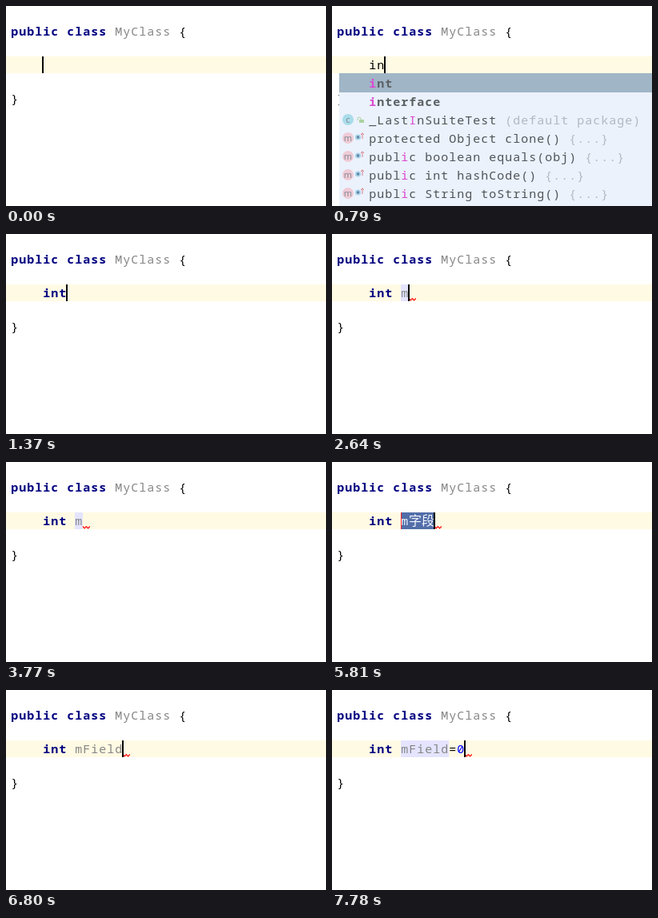
Write an HTML page that moves like this. It is 400x250 px and loops after 8000 ms.

```html
<!DOCTYPE html>
<html lang="en">
<head>
<meta charset="utf-8">
<title>Field naming in an editor</title>
<style>
  html, body { margin: 0; width: 100%; height: 100%; overflow: hidden; background: #fff; }
  svg { display: block; width: 400px; height: 250px; }
  text {
    font: 300 15px "Noto Sans Mono", "DejaVu Sans Mono", monospace;
    letter-spacing: 1px;
    white-space: pre;
  }
  .kw { font-weight: 700; fill: #000080; }
  .dim { fill: #868686; }
  .num { fill: #0000ff; }
  .sel { fill: #f4f7ff; }
  .cjk { font: 16px "Noto Sans CJK SC", "Noto Sans CJK", sans-serif; letter-spacing: 0; }
  .item { fill: #505459; }
  .bold { font-weight: 700; fill: #5c6064; }
  .hit { fill: #dc4ad0; }
  .tail { fill: #b2b8c0; }
  .badge { font: 11px "Noto Sans", sans-serif; letter-spacing: 0; text-anchor: middle; fill: #858b94; }
</style>
</head>
<body>
<svg id="stage" viewBox="0 0 400 250"></svg>
<script>
const LOOP = 8000;
const LEFT = 6.3, CELL = 10, ROW = 23;
const stage = document.getElementById("stage");

const colX = col => LEFT + col * CELL;
const span = (cls, s) => `<tspan class="${cls}">${s}</tspan>`;
const text = (x, y, s, cls = "") => `<text x="${x}" y="${y}" class="${cls}">${s}</text>`;
const rect = (x, y, w, h, fill) =>
  `<rect x="${x}" y="${y}" width="${w}" height="${h}" fill="${fill}"/>`;

// Each step changes only the listed parts of the editor state.
const steps = [
  [0, { word: "", name: "", cls: "", tail: "", caret: 45, wave: 0, mark: 0, bulb: 0, box: 0, list: 0, names: 0 }],
  [550, { word: "i", caret: 55 }],
  [670, { list: 1 }],
  [790, { word: "in", caret: 65 }],
  [910, { word: "int", caret: 75 }],
  [1370, { list: 0 }],
  [1650, { caret: 85 }],
  [1770, { wave: 86 }],
  [2040, { wave: 76 }],
  [2340, { name: "m", caret: 95 }],
  [2640, { cls: "dim", wave: 96, mark: 10 }],
  [3240, { bulb: 1 }],
  [3490, { caret: 0 }],
  [3770, { bulb: 0 }],
  [4360, { name: "m字段", caret: 127, wave: 128 }],
  [4730, { mark: 42 }],
  [5260, { bulb: 1 }],
  [5410, { caret: 0 }],
  [5810, { bulb: 0, box: 1, cls: "sel", mark: 0, caret: 127 }],
  [5960, { names: .6 }],
  [6110, { names: 1 }],
  [6360, { caret: 0 }],
  [6800, { names: 0, box: 0, name: "mField", cls: "dim", caret: 145, wave: 146 }],
  [7100, { mark: 60 }],
  [7380, { tail: "=", caret: 155, wave: 156 }],
  [7780, { tail: "=" + span("num", "0"), caret: 165, wave: 166 }]
];

function wave(x) {
  let d = `M${x} 80.5`;
  for (let i = 1; i <= 4; i++) d += `L${x + i * 2.2} ${i % 2 ? 82.8 : 80.5}`;
  return `<path d="${d}" fill="none" stroke="#ff0000" stroke-width="1.2"/>`;
}

const bulb = `<circle cx="20" cy="68.3" r="4.8" fill="#f5c04a"/>` +
  rect(17.5, 73, 5, 1.6, "#8a8f96") + rect(18, 75.5, 4, 1.6, "#8a8f96");

function badge(y, letter, fill) {
  return `<circle cx="20" cy="${y}" r="7" fill="${fill}"/>` + text(20, y + 3.5, letter, "badge");
}

const lock = y => rect(34, y, 6, 4, "#a9d3a0") +
  `<path d="M32 ${y + 1}v-2q0-2 2-2t2 2v1" fill="none" stroke="#a9d3a0"/>`;

const override = y => `<circle cx="32.5" cy="${y}" r="3.6" fill="#a9d3ea"/>` +
  `<circle cx="32.5" cy="${y}" r="1.7" fill="#5f84a0"/>` +
  `<path d="M38 ${y + 2}v-7m-2 2l2-2.2l2 2.2" fill="none" stroke="#d9818c"/>`;

function completionList() {
  const hit = s => span("hit", s);
  const pub = `publ${hit("i")}c `;
  const body = " " + span("tail", "{...}");
  const items = [
    span("bold", hit("i") + "nt"),
    span("bold", hit("i") + "nterface"),
    `_Last${hit("I")}nSuiteTest ` + span("tail", "(default package)"),
    "protected Object clone()" + body,
    pub + "boolean equals(obj)" + body,
    pub + "int hashCode()" + body,
    pub + "String toString()" + body
  ];
  let out = rect(9, 84, 391, 166, "#ebf2fc") + rect(9, 84, 391, 1 + ROW, "#a0b5c6");
  items.forEach((s, i) => {
    const y = 102 + i * ROW, mid = y - 6;
    out += text(colX(4), y, s, "item");
    if (i === 2) out += badge(mid, "c", "#a9dcea") + lock(mid);
    if (i > 2) out += badge(mid, "m", "#efcbd6") + override(mid - 1);
  });
  return out;
}

function nameList(opacity) {
  let out = `<rect x="76.5" y="84.5" width="180" height="93" fill="#ebf4fe" stroke="#b5c1cc"/>` +
    rect(77, 85, 179, ROW, "#0052a4");
  ["mField", "MField", "m_field", "M_FIELD"].forEach((s, i) => {
    out += text(colX(8), 102 + i * ROW, s, i ? "" : "sel");
  });
  return `<g opacity="${opacity}">${out}</g>`;
}

function codeLine(s) {
  const ascii = s.name.replace("字段", "");
  let out = rect(0, 63, 400, 21, "#fffae3");
  if (s.mark) out += rect(86, 63, s.mark, 21, "#e4e4ff");
  if (s.box) out += rect(86, 63, 42, 21, "#526ea8") + rect(86, 63, 1, 21, "#ff2020") + rect(127, 63, 1, 21, "#ff2020");
  out += text(colX(4), 79, s.word, s.word === "int" ? "kw" : "");
  out += text(colX(8), 79, span(s.cls, ascii) + s.tail);
  if (ascii !== s.name) out += text(96, 79, "字段", "cjk " + (s.mark === 10 ? "" : s.cls));
  if (s.wave) out += wave(s.wave);
  if (s.bulb) out += bulb;
  if (s.caret) out += rect(s.caret, 63, 2, 21, "#000");
  return out;
}

function render(s) {
  stage.innerHTML =
    text(colX(0), 37, span("kw", "public class ") + span("dim", "MyClass") + " {") +
    text(colX(0), 121, "}") +
    codeLine(s) +
    (s.list ? completionList() : "") +
    (s.names ? nameList(s.names) : "");
}

let shown = -1;
function update(now) {
  const t = now % LOOP;
  const count = steps.filter(([at]) => at <= t).length;
  if (count !== shown) {
    shown = count;
    render(Object.assign({}, ...steps.slice(0, count).map(([, part]) => part)));
  }
}

const start = performance.now();
function tick() {
  update(performance.now() - start);
  requestAnimationFrame(tick);
}
tick();
</script>
</body>
</html>
```
